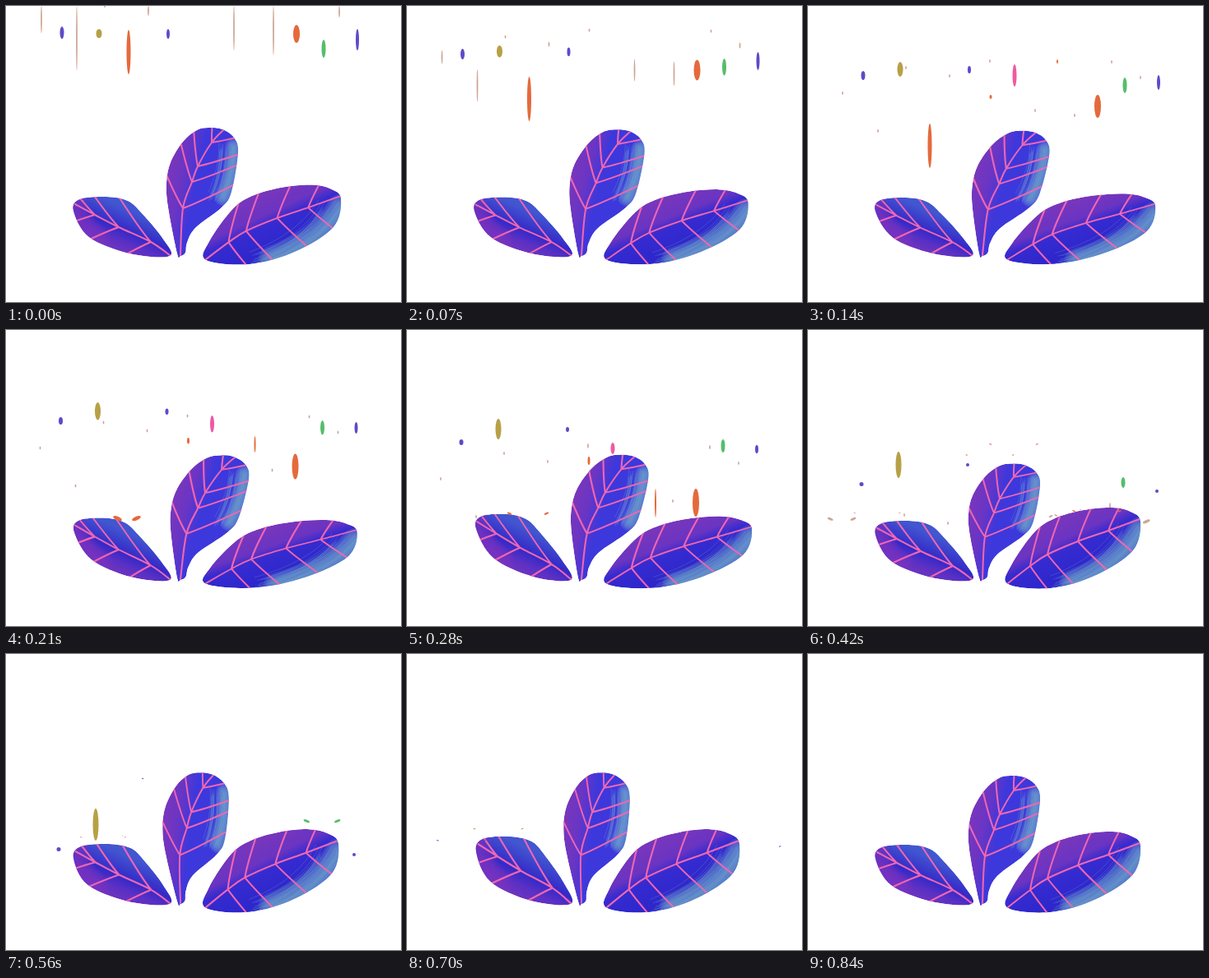
An HTML page with a canvas that plays this animation: 480 by 360 pixels, repeating every 0.91 s.

```html
<!DOCTYPE html>
<html lang="en">
<head>
<meta charset="utf-8">
<title>Rain on leaves</title>
<style>
  html, body { margin: 0; width: 100%; height: 100%; overflow: hidden; background: #fff; }
  canvas { display: block; width: 480px; height: 360px; }
</style>
</head>
<body>
<canvas id="stage" width="480" height="360"></canvas>
<script>
const ctx = document.getElementById('stage').getContext('2d');
const STEP = 70, STEPS = 13;
const VIOLET = '#7836bc', BLUE = '#3c38dc', STEEL = '#6fa5c8', ROSE = '#f066b2';
const PURPLE = '#6049c8', ORANGE = '#e46a3c', TAN = '#cfa596';
const rad = deg => deg * Math.PI / 180;

function seeded(seed) {
  return () => (seed = (seed * 16807) % 2147483647) / 2147483647;
}

const points = text => text.split(' ').map(p => p.split(',').map(Number));

// Smooth curve through the points
function smooth(pts, closed) {
  const n = pts.length, path = new Path2D();
  const at = i => pts[closed ? (i + n) % n : Math.max(0, Math.min(n - 1, i))];
  path.moveTo(...pts[0]);
  for (let i = 0; i < (closed ? n : n - 1); i++) {
    const [a, b, c, d] = [at(i - 1), at(i), at(i + 1), at(i + 2)];
    path.bezierCurveTo(b[0] + (c[0] - a[0]) / 6, b[1] + (c[1] - a[1]) / 6,
                       c[0] - (d[0] - b[0]) / 6, c[1] - (d[1] - b[1]) / 6, c[0], c[1]);
  }
  return path;
}

// Side veins fan out from the inner points of the midrib; the rim cuts them off.
function veins(rib, fans) {
  const path = smooth(rib);
  rib.slice(1, -1).forEach(([x, y], i) => {
    for (const [angle, turn] of fans) {
      const a = rad(angle + turn * i), b = a + rad(angle < -60 ? -7 : 5);
      path.moveTo(x, y);
      path.quadraticCurveTo(x + 20 * Math.cos(b), y + 20 * Math.sin(b),
                            x + 75 * Math.cos(a), y + 75 * Math.sin(a));
    }
  });
  return path;
}

function gradient(line, stops) {
  const g = ctx.createLinearGradient(...line);
  stops.forEach(([at, color]) => g.addColorStop(at, color));
  return g;
}

// rest, sway and jolt each give two rim points: [x1, y1, x2, y2]
const leaves = [
  {
    outline: '82,249 90,235 122,232 148,237 165,252 190,282 199,304 150,301 101,281',
    rib: '199,303 176,287 137,269 108,254 84,241',
    fans: [[-125, -2], [152, 4]],
    fill: gradient([118, 297, 143, 238], [[0, VIOLET], [.3, '#5a30c4'], [.5, '#3429c8'], [.9, '#4256d0']]),
    brush: { color: VIOLET, width: 22, path: 'M84 236Q84 262 112 284' },
    rest: [82, 249, 148, 238], sway: [0, 1, -4, 1], jolt: [2, -8, 0, -8],
    jolts: [2, 5], spread: 1
  },
  {
    outline: '243,309 247,286 275,246 300,229 335,219 370,216 392,221 404,233 395,268 350,298 295,314',
    rib: '243,308 270,287 291,273 328,257 365,244 403,230',
    fans: [[-75, 4], [52, -4]],
    fill: gradient([310, 228, 345, 302], [[0, VIOLET], [.3, '#6a34c2'], [.45, '#352bd0'], [1, '#2a24c8']]),
    brush: { color: STEEL, width: 24, path: 'M404 244Q380 286 322 308' },
    rest: [282, 241, 403, 236], sway: [3, 2, 0, 3], jolt: [4, 9, 24, 10],
    jolts: [1.4], spread: 1.6
  },
  {
    outline: '208,301 197,245 195,215 200,190 215,165 232,151 247,148 263,150 277,160 282,178 274,226 262,245 230,270 220,288 218,300 212,304',
    rib: '212,303 215,246 226,214 233,195 250,166 265,150',
    fans: [[-115, 10], [-25, 4]],
    fill: gradient([200, 195, 282, 212], [[0, VIOLET], [.2, '#6a35c4'], [.42, BLUE], [1, BLUE]]),
    brush: { color: STEEL, width: 16, path: 'M277 172Q277 205 264 232' },
    rest: [195, 215, 282, 178], sway: [5.5, 3, 13, 3], jolt: [0, 9, 0, 11],
    jolts: [3], spread: 1
  }
].map(leaf => {
  const rib = points(leaf.rib);
  return { ...leaf, root: rib[0], outline: smooth(points(leaf.outline), true),
           veins: veins(rib, leaf.fans), stroke: new Path2D(leaf.brush.path) };
});

function pose({ rest, sway, jolt, jolts, spread }, beat) {
  const swing = Math.sin(beat * Math.PI / 3);
  const hit = jolts.reduce((sum, at) => sum + Math.max(0, 1 - Math.abs(beat - at) / spread), 0);
  return rest.map((v, i) => v + sway[i] * swing + jolt[i] * hit);
}

// Soft edge first, then single brush hairs
function paint({ color, width }, path) {
  const rand = seeded(77);
  ctx.strokeStyle = color;
  ctx.globalAlpha = .2;
  for (let i = 1; i <= 7; i++) {
    ctx.lineWidth = width * i / 5;
    ctx.stroke(path);
  }
  ctx.lineWidth = .8;
  ctx.globalAlpha = .35;
  for (let i = 0; i < 16; i++) {
    ctx.save();
    ctx.translate((rand() - .7) * width * 1.6, (rand() - .6) * width * .8);
    ctx.stroke(path);
    ctx.restore();
  }
  ctx.globalAlpha = 1;
}

// Shears the resting leaf about its root so that both rim points reach the pose
function drawLeaf(leaf, beat) {
  const [rx, ry] = leaf.root;
  const local = ([x1, y1, x2, y2]) => [x1 - rx, y1 - ry, x2 - rx, y2 - ry];
  const [a, b, c, d] = local(leaf.rest);
  const [e, f, g, h] = local(pose(leaf, beat));
  const det = a * d - b * c;

  ctx.save();
  ctx.translate(rx, ry);
  ctx.transform((e * d - g * b) / det, (f * d - h * b) / det,
                (g * a - e * c) / det, (h * a - f * c) / det, 0, 0);
  ctx.translate(-rx, -ry);
  ctx.clip(leaf.outline);
  ctx.fillStyle = leaf.fill;
  ctx.fill(leaf.outline);
  ctx.lineCap = ctx.lineJoin = 'round';
  paint(leaf.brush, leaf.stroke);
  ctx.strokeStyle = ROSE;
  ctx.lineWidth = 2;
  ctx.stroke(leaf.veins);
  ctx.restore();
}

// tip: lower end at the start; speed and grow (of the height) are per beat
const drop = (color, x, tip, speed, w, h, grow, ground, born = 0) =>
  ({ color, x, tip, speed, w, h, grow, ground, born });

const drizzle = [[43, 33], [86, 79], [120, 2], [173, 12], [222, -6], [277, 54], [325, 60], [370, -5], [405, 14]]
  .map(([x, tip]) => drop(TAN, x, tip, 75, 1.8, tip, -tip, 238));

const rain = [
  drop(PURPLE, 68, 40, 50, 5, 15, -4, 243),
  drop('#b7a046', 113, 39, 47, 7, 11, 7, 229),
  drop(ORANGE, 149, 83, 114, 5, 54, 0, 236),
  drop(PURPLE, 197, 40, 42, 4, 12, -3, 168),
  drop(ORANGE, 223, 62, 51, 3, 0, 5, 168, 1),
  drop('#ee5aa2', 252, 45, 53, 5, 40, -13, 155, 1),
  drop(ORANGE, 304, -88, 158, 2, -25, 30, 235),
  drop(ORANGE, 353, 45, 91, 8, 22, 6, 236),
  drop('#55bd6c', 386, 63, 43, 5, 22, -3, 214),
  drop(PURPLE, 427, 54, 48, 4, 26, -8, 250)
];

function blob(x, y, w, h, angle = 0) {
  ctx.beginPath();
  ctx.ellipse(x, y, w / 2, h / 2, angle, 0, 2 * Math.PI);
  ctx.fill();
}

function drawDrop({ color, x, tip, speed, w, h, grow, ground, born }, beat) {
  const age = beat - (ground - tip) / speed;
  if (beat < born || age > 1) return;
  ctx.fillStyle = color;
  if (age < 0) {
    const tall = Math.max(w, 4, h + grow * beat);
    blob(x - beat, tip + speed * beat - tall / 2, w, tall);
    return;
  }
  // Two bits leap aside and fade
  const size = (w + 6) * (1.2 - age), out = 8 + 22 * age;
  for (const side of [-1, 1]) blob(x - 2 + side * out, ground - 5 - 12 * age, size, size * .4, side * -.4);
}

function draw(beat) {
  ctx.fillStyle = '#fff';
  ctx.fillRect(0, 0, 480, 360);
  drizzle.forEach(d => drawDrop(d, beat));
  leaves.forEach(l => drawLeaf(l, beat));
  rain.forEach(d => drawDrop(d, beat));
}

const start = performance.now();
let shown = -1;
function tick() {
  const step = Math.floor((performance.now() - start) / STEP) % STEPS;
  if (step !== shown) draw((shown = step) / 2);
  requestAnimationFrame(tick);
}
tick();
</script>
</body>
</html>
```
